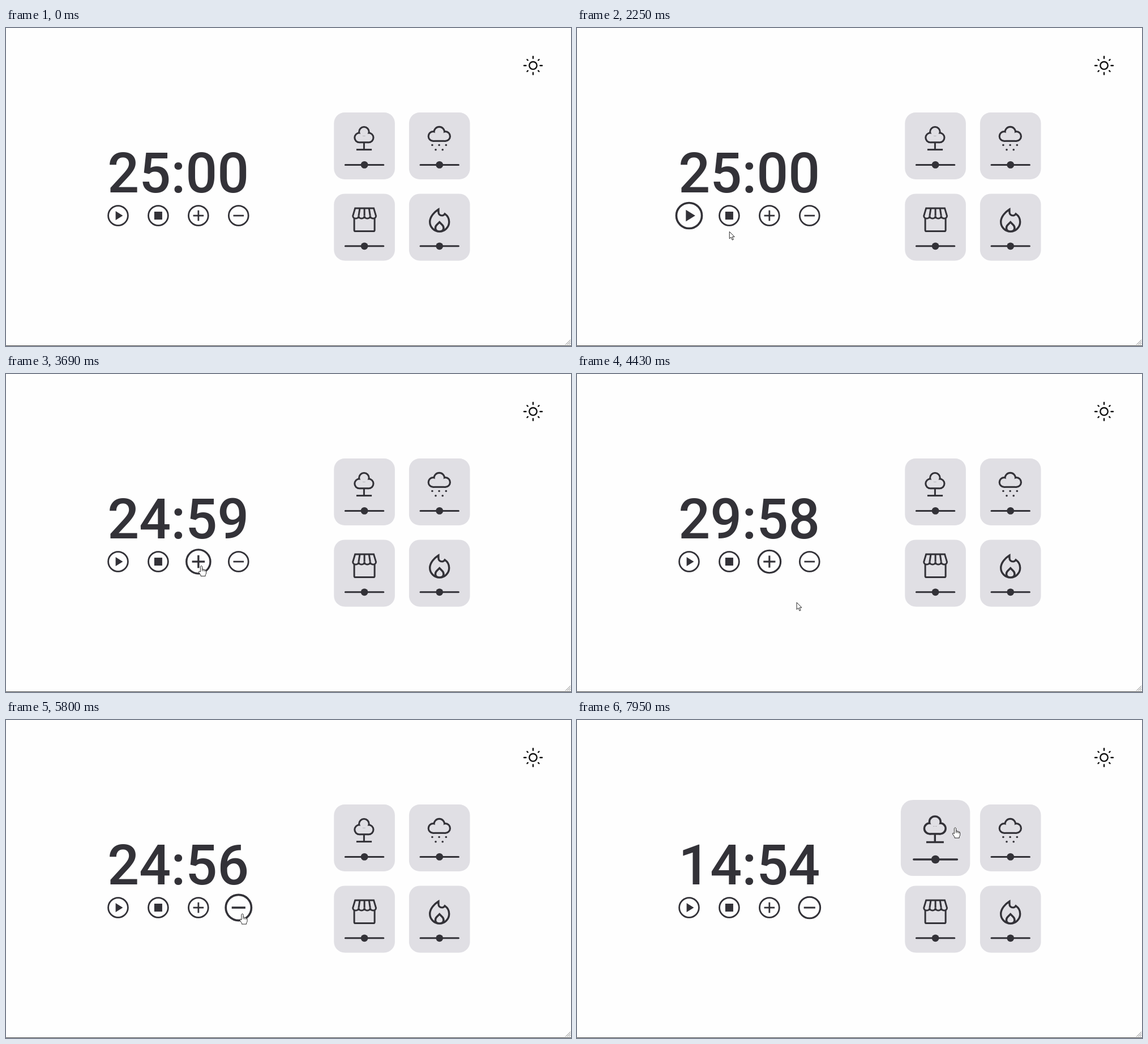
Write an HTML page with a canvas that moves like this. It is 998 by 561 pixels and loops after 8000 ms.

```html
<!DOCTYPE html>
<html lang="en">
<head>
<meta charset="utf-8">
<title>Focus timer</title>
<style>
  html, body { margin: 0; width: 100%; height: 100%; overflow: hidden; background: #fefefe; }
  canvas { display: block; }
</style>
</head>
<body>
<canvas id="stage" width="998" height="561"></canvas>
<script>
const ctx = document.getElementById('stage').getContext('2d');
const LOOP = 8000, FADE = 700, GROW = 0.3;
const INK = '#333238', CARD = '#e0dfe4', PAPER = '#fefefe';

const FLAME = new Path2D('M-1.8 -18.5 C-9 -14 -17 -5.5 -17 3.5 A17 17 0 0 0 17 3.5 C17 -2.5 14 -7.5 9.4 -10.6 Q7.4 -7.6 4.7 -7.6 C0.5 -7.6 -1.8 -10.5 -1.8 -14 Z M0 4 L-5 9 C-9 13 -8 20.5 0 20.5 C8 20.5 9 13 5 9 Z');
const ARROW = new Path2D('M0 0 V12.4 L2.9 9.8 L5 14.8 L7 13.9 L5 9.1 H8.9 Z');
const HAND = new Path2D('M-1.6 11 V1.6 Q0 -1.2 1.6 1.6 V6.4 Q3.4 5.6 4.1 7 Q6 6.4 6.5 8 Q8.6 7.4 8.6 9.6 V13 Q8.6 15 7.2 16.4 V18.6 H-1 V17 L-4.6 11.6 Q-5 8.8 -1.6 11 M1.6 6.4 V9.8 M4.1 7 V10 M6.5 8 V10.4');

const buttons = [
  { draw: play, hover: [1230, 2235] },
  { draw: stop },
  { draw: plus, hover: [3400, 4210] },
  { draw: minus, hover: [4760, 7650] }
];
const cards = [
  { draw: tree, hover: [7760, LOOP] },
  { draw: rain },
  { draw: shop },
  { draw: fire }
];

// Pointer stops: time, x, y
const trail = [
  [460, 793, 533], [690, 583, 473], [1210, 191, 338], [1400, 210, 332], [2040, 210, 332],
  [2680, 443, 439], [3000, 443, 439], [3500, 345, 338], [4040, 345, 338], [4430, 388, 403],
  [4950, 417.5, 341.5], [7470, 417.5, 341.5], [7710, 575, 312], [7930, 668, 189.5]
];

// Each click on plus or minus moves the clock by five minutes.
const clicks = [[3950, 300], [5560, -300], [6350, -300], [7130, -300]];

// The CSS "ease" curve, solved by bisection
function ease(p) {
  if (p <= 0) return 0;
  if (p >= 1) return 1;
  let lo = 0, hi = 1;
  for (let i = 0; i < 20; i++) {
    const s = (lo + hi) / 2;
    const x = 0.75 * s * (1 - s) + s ** 3;
    if (x < p) lo = s; else hi = s;
  }
  return 0.3 * lo * (1 - lo) ** 2 + 3 * lo * lo * (1 - lo) + lo ** 3;
}

function scaleOf({ hover }, t) {
  if (!hover) return 1;
  const [enter, leave] = hover;
  let p = ease((Math.min(t, leave) - enter) / FADE);
  if (t > leave) p *= 1 - ease((t - leave) / (FADE * p));
  return 1 + GROW * p;
}

// Tangent that never overshoots a stop
function slope(i, axis) {
  const a = trail[i - 1], b = trail[i], c = trail[i + 1];
  if (!a || !c) return 0;
  const before = (b[axis] - a[axis]) / (b[0] - a[0]);
  const after = (c[axis] - b[axis]) / (c[0] - b[0]);
  return before * after > 0 ? 2 * before * after / (before + after) : 0;
}

function pointerAt(t) {
  let i = 0;
  while (i < trail.length - 2 && trail[i + 1][0] <= t) i++;
  const a = trail[i], b = trail[i + 1], span = b[0] - a[0];
  const u = Math.min(1, (t - a[0]) / span), v = 1 - u;
  return [1, 2].map(k =>
    v * v * (1 + 2 * u) * a[k] + u * u * (3 - 2 * u) * b[k] +
    span * u * v * (v * slope(i, k) - u * slope(i + 1, k)));
}

function clockAt(t) {
  let s = 1500 - Math.max(0, 1 + Math.floor((t - 2690) / 1023));
  for (const [time, change] of clicks) if (t >= time) s += change;
  const pad = n => String(n).padStart(2, '0');
  return pad(Math.floor(s / 60)) + ':' + pad(s % 60);
}

function at(x, y, scale, draw) {
  ctx.save();
  ctx.translate(x, y);
  ctx.scale(scale, scale);
  draw();
  ctx.restore();
}

function disc(x, y, r) {
  ctx.beginPath();
  ctx.arc(x, y, r, 0, Math.PI * 2);
}

function dot(x, y, r) {
  disc(x, y, r);
  ctx.fill();
}

function line(x1, y1, x2, y2) {
  ctx.beginPath();
  ctx.moveTo(x1, y1);
  ctx.lineTo(x2, y2);
  ctx.stroke();
}

// Outline of three joined circles: one on top, two at the sides
function puff(x, top, topR, side, low, sideR) {
  for (const [colour, d] of [[INK, 1.5], [CARD, -1.6]]) {
    ctx.fillStyle = colour;
    dot(x, top, topR + d);
    dot(x - side, low, sideR + d);
    dot(x + side, low, sideR + d);
    ctx.fillRect(x - side, low - 3, 2 * side, sideR + d + 3);
  }
  ctx.fillStyle = INK;
}

function play() {
  ctx.beginPath();
  ctx.moveTo(-4.4, -8);
  ctx.lineTo(8.4, 0);
  ctx.lineTo(-4.4, 8);
  ctx.fill();
}

function stop() { ctx.fillRect(-7, -7, 14, 14); }

function minus() { line(-9.3, 0, 9.3, 0); }

function plus() {
  minus();
  line(0, -9.3, 0, 9.3);
}

function tree() {
  puff(-0.7, -24.7, 8.8, 8.2, -14.6, 8.4);
  line(-0.7, -6, -0.7, 6.6);
  line(-14.2, 6.6, 13, 6.6);
}

function rain() {
  puff(-0.4, -24.4, 9.3, 10.8, -17, 8.4);
  for (let i = 0; i < 5; i++) dot(-12.8 + 6.1 * i, i % 2 ? 6.7 : -1.5, 1.8);
}

function shop() {
  const eave = 10.2, roof = 8.2;
  ctx.beginPath();
  ctx.moveTo(-2 * eave, -20);
  ctx.lineTo(-2 * roof, -33.5);
  ctx.lineTo(2 * roof, -33.5);
  ctx.lineTo(2 * eave, -20);
  for (let i = 2; i > -2; i--) {
    ctx.bezierCurveTo(eave * i, -13.8, eave * (i - 1), -13.8, eave * (i - 1), -20);
  }
  ctx.closePath();
  ctx.stroke();
  for (let i = -1; i < 2; i++) line(roof * i, -33, eave * i, -20);
  ctx.beginPath();
  ctx.moveTo(-18, -15.5);
  ctx.arcTo(-18, 7.2, 0, 7.2, 2.2);
  ctx.arcTo(18, 7.2, 18, -15.5, 2.2);
  ctx.lineTo(18, -15.5);
  ctx.stroke();
}

function fire() {
  ctx.lineWidth = 3.4;
  ctx.translate(0, -12.9);
  ctx.stroke(FLAME);
}

function drawButton({ draw }) {
  ctx.strokeStyle = ctx.fillStyle = INK;
  ctx.lineWidth = 2.8;
  disc(0, 0, 17.4);
  ctx.stroke();
  draw();
}

function drawCard({ draw }) {
  ctx.fillStyle = CARD;
  ctx.beginPath();
  ctx.roundRect(-53.8, -59, 107.6, 118, 19);
  ctx.fill();
  ctx.strokeStyle = ctx.fillStyle = INK;
  ctx.lineWidth = 3;
  at(0, 0, 1, draw);
  ctx.lineCap = 'round';
  line(-33.7, 33.4, 33.7, 33.4);
  dot(0, 33.4, 6.4);
}

function drawSun() {
  ctx.strokeStyle = '#111';
  ctx.lineWidth = 2.4;
  ctx.lineCap = 'round';
  disc(0, 0, 6.7);
  ctx.stroke();
  for (let i = 0; i < 8; i++) {
    if (i % 2) line(13, 0, 14.9, 0);
    else line(12.6, 0, 15.9, 0);
    ctx.rotate(Math.PI / 4);
  }
}

function drawWindowEdge() {
  ctx.fillStyle = '#4a4a4a';
  ctx.fillRect(0, 560, 998, 1);
  ctx.strokeStyle = '#8a8a8a';
  ctx.lineWidth = 1;
  for (let d = 3; d < 10; d += 3) line(997 - d, 559, 997, 559 - d);
}

function drawPointer(t) {
  const over = [...buttons, ...cards].some(({ hover }) => hover && t >= hover[0] && t < hover[1]);
  const shape = over ? HAND : ARROW;
  at(...pointerAt(t), 1, () => {
    ctx.fillStyle = '#fff';
    ctx.strokeStyle = '#111';
    ctx.lineWidth = 0.9;
    ctx.lineJoin = 'round';
    ctx.fill(shape);
    ctx.stroke(shape);
  });
}

function render(t) {
  ctx.fillStyle = PAPER;
  ctx.fillRect(0, 0, 998, 561);
  drawWindowEdge();
  at(931, 66.2, 1, drawSun);
  ctx.fillStyle = INK;
  ctx.font = '500 98.5px Roboto, sans-serif';
  ctx.textAlign = 'center';
  ctx.fillText(clockAt(t), 304.2, 289.7);
  buttons.forEach((b, i) => at(198 + 70.93 * i, 331, scaleOf(b, t), () => drawButton(b)));
  cards.forEach((c, i) => {
    const x = 633.1 + 132.6 * (i % 2), y = 208 + 143.4 * Math.floor(i / 2);
    at(x, y, scaleOf(c, t), () => drawCard(c));
  });
  if (t >= trail[0][0]) drawPointer(t);
}

const start = performance.now();
function tick() {
  render((performance.now() - start) % LOOP);
  requestAnimationFrame(tick);
}
tick();
</script>
</body>
</html>
```
